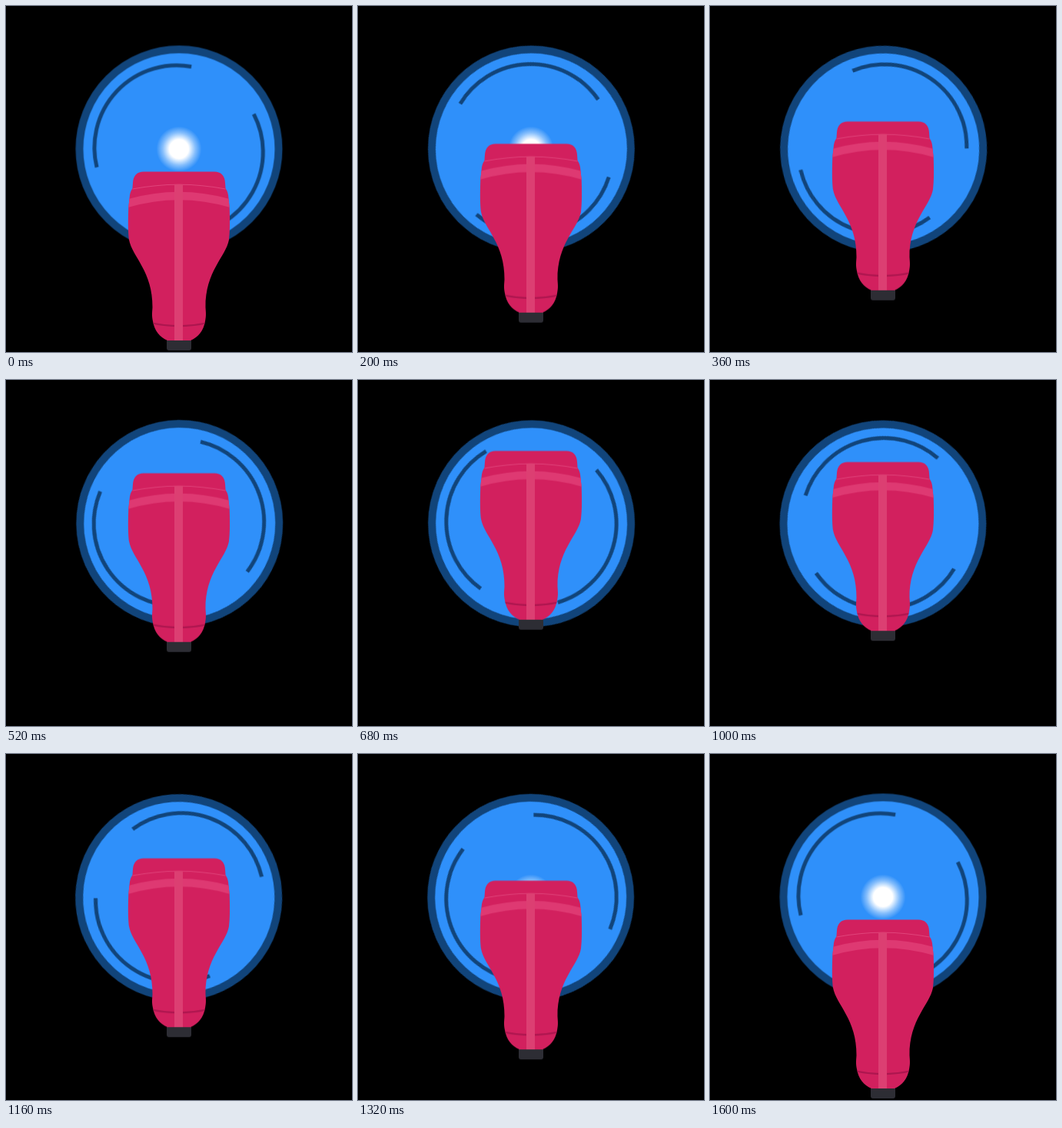
An HTML page that plays this animation: 450 px wide and 450 px high, repeating every 1640 ms.

```html
<!DOCTYPE html>
<html lang="en">
<head>
<meta charset="utf-8">
<title>Bulb and ring</title>
<style>
  html, body { margin: 0; width: 100%; height: 100%; overflow: hidden; background: #000; }
  svg { display: block; width: 100vw; height: 100vh; }
  #ring { transform-origin: 0 0; }
</style>
</head>
<body>
<svg viewBox="0 0 450 450">
  <defs>
    <radialGradient id="glow">
      <stop offset="0" stop-color="#fff"/>
      <stop offset=".42" stop-color="#fff"/>
      <stop offset=".72" stop-color="#fff" stop-opacity=".42"/>
      <stop offset="1" stop-color="#fff" stop-opacity="0"/>
    </radialGradient>
    <path id="shell" d="M164.5 237.5 Q225 226 285.5 237.5 Q288 240 289 246 L290.7 262
      C291.5 285 291 295 290 304 C286 326 259 345 259.5 392
      C260 400 260.5 402 259 410 C257 422 250 431 240 435 H210
      C200 431 193 422 191 410 C189.5 402 190 400 190.5 392
      C191 345 164 326 160 304 C159 295 158.5 285 159.3 262 L161 246 Q162 240 164.5 237.5Z"/>
    <clipPath id="inside"><use href="#shell"/></clipPath>
  </defs>

  <g transform="translate(225.2 186.4)">
    <!-- every part sits slightly off the pivot, so the ring wobbles as it turns -->
    <g id="ring" fill="none" stroke="#11447a">
      <circle cx="-.2" cy="-.5" r="129.5" stroke-width="10" fill="#2f90fa"/>
      <path stroke-width="5" d="M-107.1 23.4 A107 107 0 0 1 15.9 -107.5
                                M97 -45.9 A107 107 0 0 1 9.6 110.2"/>
    </g>
  </g>
  <circle cx="225" cy="186" r="29.5" fill="url(#glow)"/>

  <g id="bulb">
    <path fill="#2d2d34" d="M209 434 H241 V445 Q241 448 238 448 H212 Q209 448 209 445Z"/>
    <g fill="#d2205e">
      <path d="M164 243 L165 230 Q166 215.5 179 215.5 H271 Q284 215.5 285 230 L286 243Z"/>
      <use href="#shell"/>
    </g>
    <g clip-path="url(#inside)" fill="none">
      <path stroke="#e0437a" stroke-width="2" d="M164.5 237.5 Q225 226 285.5 237.5"/>
      <path stroke="#de3972" stroke-width="10.5" d="M157 257 Q225 237 293 257"/>
      <path stroke="#ad164f" stroke-width="2" d="M190 412.5 Q225 420 260 412.5"/>
      <path stroke="#dc3f72" stroke-width="11" d="M224.5 231 V435"/>
    </g>
  </g>
</svg>
<script>
  // 41 even poses of 40 ms, first and last alike
  const timing = { duration: 1640, iterations: Infinity, easing: 'steps(41, jump-none)' };
  const play = (id, ...poses) =>
    document.getElementById(id).animate(poses.map(transform => ({ transform })), timing);

  play('ring', 'rotate(0deg)', 'rotate(360deg)');
  play('bulb', 'translateY(0px)', 'translateY(-145px)', 'translateY(0px)');
</script>
</body>
</html>
```
